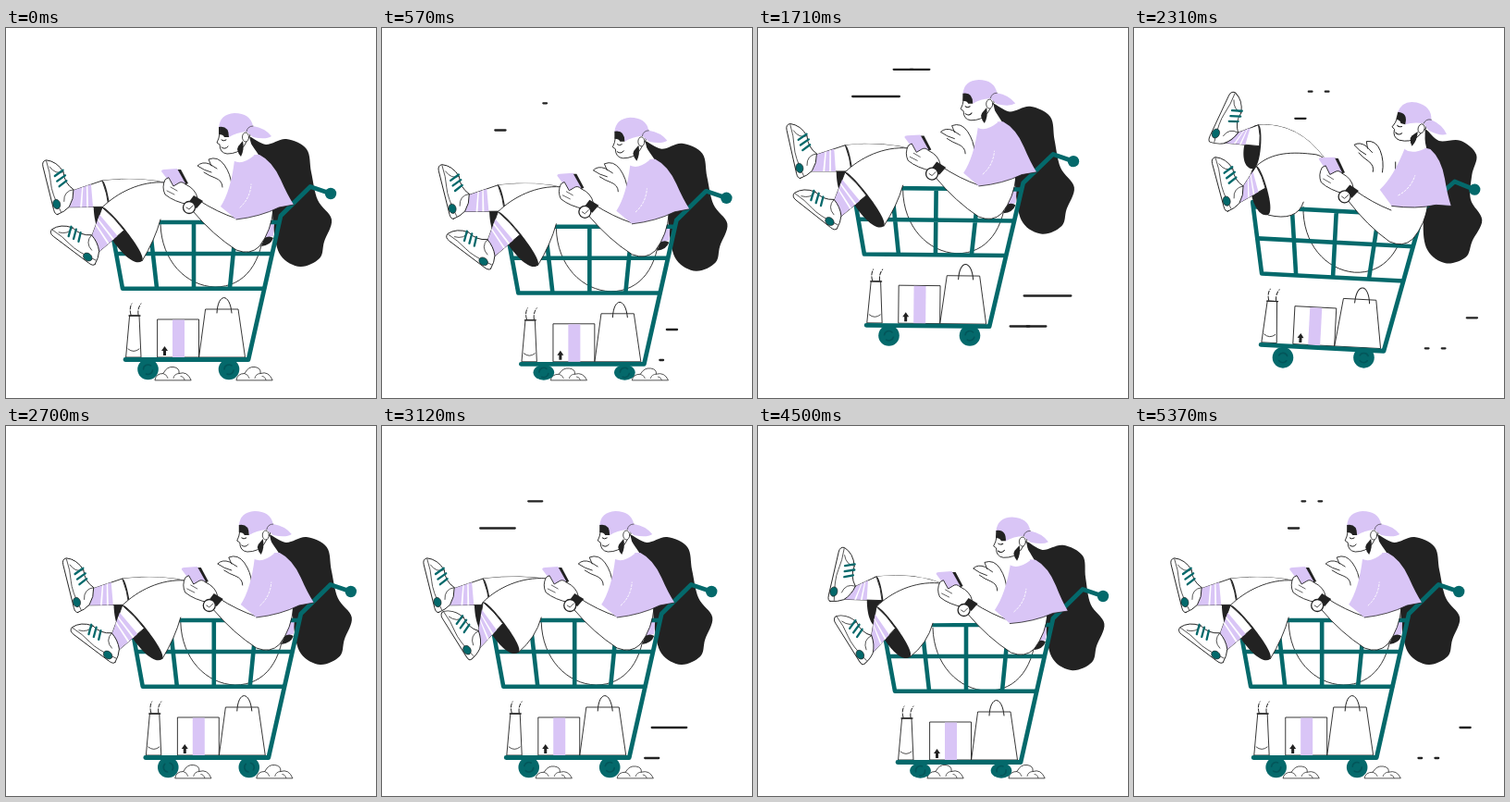
Animation of 400 by 400 pixels, one loop 5400 ms. Source, as an HTML page with a canvas:

```html
<!DOCTYPE html>
<html lang="en">
<head>
<meta charset="utf-8">
<title>Shopping cart ride</title>
<style>
html, body { margin: 0; width: 100%; height: 100%; overflow: hidden; background: #fff; }
canvas { display: block; width: 400px; height: 400px; }
</style>
</head>
<body>
<canvas id="stage"></canvas>
<script>
const LOOP = 5400, STEP = 30;
const TEAL = '#04696b', DEEP = '#03565a', INK = '#222', LILAC = '#d9c5f6', WHITE = '#fff';
const canvas = document.getElementById('stage');
const c = canvas.getContext('2d');
const ratio = window.devicePixelRatio || 1;
canvas.width = canvas.height = 400 * ratio;

const clamp = v => Math.max(0, Math.min(1, v));
const ease = v => .5 - .5 * Math.cos(Math.PI * clamp(v));

// Eases up from a to b, holds until d, eases back down by e
const swell = (t, a, b, d, e) => t < b ? ease((t - a) / (b - a)) : 1 - ease((t - d) / (e - d));
const bump = (t, mid, half) => swell(t, mid - half, mid, mid, mid + half);

const jumps = [
  { from: 620, top: 810, to: 990, high: 51 },
  { from: 1590, top: 2000, to: 2341, high: 73 },
  { from: 3990, top: 4240, to: 4460, high: 46 }
];

// Parabolic jumps with a dip just before and just after
function lift(t) {
  let y = 0;
  for (const { from, top, to, high } of jumps) {
    const u = (t - top) / (t < top ? top - from : to - top);
    if (Math.abs(u) < 1) return -high * (1 - u * u);
    y += 5 * (bump(t, from - 60, 80) + bump(t, to + 40, 80));
  }
  return y;
}

const drift = t => 22 * swell(t, 0, 640, 920, 1700) - 12 * swell(t, 920, 1700, 1780, 2750)
  + 22 * swell(t, 1780, 2750, 2750, 3390) - 5 * swell(t, 2750, 3390, 3900, 4460)
  + 22 * swell(t, 3900, 4460, 4860, 5400);

const tilt = t => 3 * swell(t, 1590, 2000, 2310, 2390)
  + 2 * (bump(t, 810, 190) + bump(t, 4230, 230));

// A few swings drive the whole figure
function poseAt(t) {
  const landing = bump(t, 1110, 300), flight = swell(t, 1650, 2310, 2310, 2520);
  const raise = flight + .4 * (bump(t, 830, 230) + bump(t, 4230, 240));
  const far = .23 * landing + 1.2 * flight + 1.4 * bump(t, 4215, 700);
  const near = flight + .6 * swell(t, 2750, 3120, 4500, 5000);
  const lean = .1 * landing + .2 * flight + .09 * bump(t, 3930, 420) + .04 * bump(t, 4500, 300);
  return {
    raise, lean,
    drop: 40 * lean - 14 * raise,
    tap: .7 * flight + bump(t, 3930, 420),
    farLeg: {
      heel: [54 + 7 * raise, 202 - 20 * far - 36 * raise], angle: 76 + 30 * far,
      top: [104 + 50 * lean, 165 - 8 * far - 34 * raise],
      end: [110, 226 - 14 * far - 40 * raise]
    },
    nearLeg: {
      heel: [95 - 9 * near - 10 * raise + 40 * lean, 257 - 6 * near - 34 * raise], angle: 37 + 35 * near,
      top: [104 + 50 * lean, 194 - 6 * near - 22 * raise],
      end: [147 - 8 * near - 10 * raise, 252 - 12 * near - 22 * raise]
    }
  };
}

function draw(path, fill, stroke = INK, width = .9) {
  const p = typeof path === 'string' ? new Path2D(path) : path;
  if (fill) { c.fillStyle = fill; c.fill(p); }
  if (stroke) { c.strokeStyle = stroke; c.lineWidth = width; c.stroke(p); }
}
const line = (d, color = INK, width = .9) => draw(d, null, color, width);
function oval(x, y, rx, ry, fill, stroke = null, width = .9) {
  const p = new Path2D();
  p.ellipse(x, y, rx, ry, 0, 0, 7);
  draw(p, fill, stroke, width);
}
function group(paint) { c.save(); paint(); c.restore(); }
const lerp = (a, b, k) => [a[0] + (b[0] - a[0]) * k, a[1] + (b[1] - a[1]) * k];
const add = (a, x, y) => [a[0] + x, a[1] + y];
function side(a, b, d) {
  const x = b[0] - a[0], y = b[1] - a[1], n = Math.hypot(x, y);
  return [y / n * d, -x / n * d];
}
function spin([x, y], a) {
  return [x * Math.cos(a) - y * Math.sin(a), x * Math.sin(a) + y * Math.cos(a)];
}

// Strokes that grow from the left and vanish to the right within six steps
function speedLines(phase) {
  if (!phase) return;
  const from = clamp((2 * phase - 5) / 6), to = clamp((2 * phase - 1) / 6);
  const streak = (x, y, size) => line(`M${x + from * size + 1},${y}H${x + to * size - 1}`, INK, 2.3);
  for (const [x, y, tailX, tailY] of [[100, 110.5, 152, 81.3], [285.5, 326, 278, 359]]) {
    streak(x, y, 79);
    streak(tailX, tailY, 34);
    if (phase > 2) streak(tailX + 18, tailY, 34);
  }
}

function dust(x, phase) {
  group(() => {
    c.translate(x, 380.5);
    c.scale(1, .93 + .07 * Math.cos(phase * Math.PI * 2 / 3));
    draw('M8,0Q9,-7 17,-7Q21,-15 28,-14Q35,-13 34,-7Q43,-10 47,0Z', WHITE, INK, .8);
    line('M17,-7Q21,-6 22,-2M34,-7Q29,-7 28,-2M36,-4Q39,-4 40,0', INK, .7);
  });
}

function wheel(x, dip, t) {
  const y = 369 + dip * .7;
  oval(x, y, 11.3, 11.3 - dip * .6, TEAL);
  group(() => {
    c.translate(x, y); c.rotate(t / 90);
    line('M-5,0A5,5 0 0 1 3,-4M5,1A5,5 0 0 1 -2,5', DEEP, 1.6);
  });
}

function goods() {
  draw('M134,311H144L146,356H130Z', WHITE);
  line('M133,311H145', INK, 1.3);
  line('M132,347Q138,352 144,347', INK, .8);
  c.setLineDash([4, 2]);
  line('M135,310Q133,303 136,298M143,310Q142,303 146,298', INK, 1);
  c.setLineDash([]);
  draw('M164,315H208.5V356H164Z', WHITE);
  draw('M180,315.5H193V356H180Z', LILAC, null);
  draw('M171.5,344L175,349H173V354H170V349H168Z', INK, null);
  draw('M216,304H251L258.5,356H209Z', WHITE);
  line('M228,308C229,286 242,286 244,308', INK, 1);
}

function cart() {
  c.lineCap = 'butt';
  line('M113,210H296M119,244H288M155,210L163,281M203,210V281M249,210L242,281', TEAL, 4.6);
  c.lineCap = 'round';
  line('M112,205L126,281.7H279', TEAL, 4.6);
  line('M129,358.5H262L297,203L329,171.5L351,179', TEAL, 4.8);
  oval(351, 179, 6.2, 6.2, TEAL);
}

// The upper locks follow the torso, the lower ones lag behind
function hair({ lean, drop, raise }) {
  const pts = [[262,119], [281,126], [303,120], [325,131], [330,156], [337,186], [352,207],
    [344,231], [339,249], [318,258], [297,246], [289,215], [285,160]].map(([x, y]) => {
      const w = Math.max(.3, clamp((215 - y) / 90));
      return add(spin([x - 250, y - 240], lean * w), 250 + 7 * raise, 240 + drop * w);
    });
  const n = pts.length, at = i => pts[(i + n) % n], p = new Path2D();
  p.moveTo(...pts[0]);
  pts.forEach((a, i) => {
    const prev = at(i - 1), b = at(i + 1), next = at(i + 2);
    p.bezierCurveTo(...add(a, (b[0] - prev[0]) / 6, (b[1] - prev[1]) / 6),
      ...add(b, (a[0] - next[0]) / 6, (a[1] - next[1]) / 6), ...b);
  });
  draw(p, INK, null);
}

function hips(drop) {
  group(() => {
    c.translate(0, drop * .8);
    draw('M167,205C168,252 195,279 226,280C258,280 278,254 279,205Z', WHITE, null);
    line('M167,212C168,252 195,279 226,280C258,280 278,254 279,210');
    draw('M281,213L290,211L289,225L279,227Z', LILAC, null);
    draw('M279,227Q285,224 289,227Q286,235 276,236Z', INK, null);
  });
}

function shoe(heel, turn) {
  group(() => {
    c.translate(...heel);
    c.rotate(turn);
    draw('M0,-2Q-1,-10 -5,-16Q-12,-23 -22,-25Q-31,-17 -43,-19Q-56,-15 -60,-4Q-60,1 -54,1L-6,1Q0,1 0,-2Z', WHITE);
    line('M-59,-4Q-46,-5 -35,-3T-2,-6M-22,-25Q-23,-14 -12,-12M-43,-19Q-42,-10 -52,-6', INK, .7);
    line('M-45,-19L-41,-9M-39,-20L-35,-10M-33,-20L-29,-11', TEAL, 2.3);
    oval(-11, -3.5, 5.2, 4, TEAL, INK, .6);
  });
}

// Dark inside of a trouser leg, then the shin and shoe coming out of it
function foot({ heel, angle, top, end }, sock) {
  const [x, y] = side(top, end, 14), hole = new Path2D();
  hole.moveTo(...top);
  hole.bezierCurveTo(...add(top, -x, -y), ...add(end, -x * 1.3, -y * 1.3), ...end);
  hole.bezierCurveTo(...add(end, x * .7, y * .7), ...add(top, x * .4, y * .4), ...top);
  draw(hole, INK, null);

  const turn = angle * Math.PI / 180;
  const a = add(spin([-21, -24], turn), ...heel), b = add(spin([-5, -14], turn), ...heel);
  const low = add(lerp(top, end, .47), x * .3, y * .3);
  const shin = new Path2D();
  shin.moveTo(...a); shin.lineTo(...top);
  shin.quadraticCurveTo(...add(lerp(top, low, .5), x * .15, y * .15), ...low);
  shin.lineTo(...b);
  draw(shin, WHITE);
  const band = (from, to, color) => {
    const q = new Path2D();
    q.moveTo(...lerp(a, top, from)); q.lineTo(...lerp(a, top, to));
    q.lineTo(...lerp(b, low, to)); q.lineTo(...lerp(b, low, from)); q.closePath();
    draw(q, color, null);
  };
  band(0, sock, LILAC);
  band(sock * .5, sock * .57, WHITE);
  band(sock * .75, sock * .82, WHITE);
  shoe(heel, turn);
}

function legs({ farLeg, nearLeg, drop }) {
  const [nx, ny] = nearLeg.top, [fx, fy] = farLeg.top;
  const knee = [172 + (nx - 104) * .6, 167 + (ny - 194) * .6];
  const seat = [167, 207 + drop * .8];
  const far = new Path2D();
  far.moveTo(fx, fy);
  far.quadraticCurveTo(fx + 42, fy - 5, knee[0] + 8, knee[1] + 2);
  draw(far, null);
  far.lineTo(...seat); far.lineTo(...farLeg.end); far.closePath();
  draw(far, WHITE, null);
  foot(farLeg, .62);

  const near = new Path2D();
  near.moveTo(...seat);
  near.quadraticCurveTo(seat[0] - 6, seat[1] + 22, ...nearLeg.end);
  near.lineTo(nx, ny);
  near.bezierCurveTo(nx + 16, ny - 16, knee[0] - 26, knee[1] - 2, ...knee);
  near.quadraticCurveTo(knee[0] + 18, knee[1] + 3, 206, 190 + drop * .5);
  const body = new Path2D(near);
  body.lineTo(214, 207 + drop * .5); body.closePath();
  draw(body, WHITE, null);
  line(near);
  foot(nearLeg, .75);
}

function freeArm(tap) {
  draw('M236,190L232,166L244,166L246,190Z', WHITE, null);
  line('M244,190Q246,176 241,160');
  group(() => {
    c.translate(-20 * tap, 6 * tap);
    draw('M207,149Q212,144 220,147L219,142Q229,138 236,148Q243,158 244,172L234,172Q234,165 226,162Q220,160 214,156L222,156Q214,154 207,149Z', WHITE, null);
    line('M244,170Q243,158 236,148Q229,138 219,142L222,149M234,172Q234,165 226,162Q220,160 214,156M222,156Q214,154 207,149Q212,144 220,147L228,152');
  });
}

function phoneArm() {
  draw('M208,186Q228,199 248,205L288,192Q288,218 274,236Q264,246 249,240Q224,224 202,198Z', WHITE, null);
  line('M208,186Q228,199 249,206M289,196Q287,219 274,236Q264,246 249,240Q224,224 202,198');
  draw('M183,153H189L197,168L190,171Z', INK, null);
  draw('M168,155Q168,153 171,153L185,152L194,168L180,171Z', LILAC, null);
  draw('M172,164Q168,172 172,180Q182,188 198,191L207,184Q205,174 194,169Q190,165 186,168L181,171L176,162Z', WHITE);
  line('M178,172L185,176M174,176L182,180', INK, .7);
  draw('M203,181L213,187L206,195L197,189Z', INK, null);
  oval(198, 194, 6.5, 6.5, WHITE, INK, 1.3);
  line('M195,194L198,196L202,192', INK, .8);
}

function shirt() {
  draw('M247,143Q259,136 274,137Q288,144 297,164Q304,180 311,191L295,194Q275,204 249,207L232,193Q243,176 247,143Z', LILAC, null);
  line('M311,191L295,194Q275,204 249,207', INK, .8);
  c.setLineDash([2, 2]);
  line('M253,194Q264,184 265,169', WHITE, .9);
  c.setLineDash([]);
}

function head() {
  draw('M241,133L247,144Q256,148 268,138L263,117H238Z', WHITE, null);
  draw('M232,108L230,119L228,124L231,126Q231,135 239,136Q251,136 257,128L264,116L260,105Z', WHITE);
  draw('M251,128L256,122Q258,131 254,139Q251,136 250,131Z', INK, null);
  oval(259, 118, 3.5, 5, WHITE, INK, .8);
  line('M233,121Q235,123 238,121M233,129Q237,132 240,128', INK, 1);
  draw('M230,108Q231,93 247,92Q264,92 267,106Q280,108 287,117Q281,121 267,118L260,112Q249,113 241,118Q241,108 230,108Z', LILAC, null);
  draw('M230,107Q241,105 241,118L236,118Q235,115 230,115Z', INK, null);
  line('M267,106Q261,106 260,112', INK, .6);
}

function torso({ lean, drop, raise, tap }) {
  const posed = paint => group(() => {
    c.translate(250 + 7 * raise, 240 + drop); c.rotate(lean); c.translate(-250, -240);
    paint();
  });
  posed(() => freeArm(tap));
  group(() => { c.translate(65 * lean, 0); phoneArm(); });
  posed(() => { shirt(); head(); });
}

function render(time) {
  const t = Math.floor(time % LOOP / STEP) * STEP;
  const phase = t / STEP % 6, y = lift(t), dip = Math.max(0, y), pose = poseAt(t);
  c.setTransform(ratio, 0, 0, ratio, 0, 0);
  c.fillStyle = WHITE;
  c.fillRect(0, 0, 400, 400);
  c.lineCap = c.lineJoin = 'round';
  c.translate(drift(t), 0);
  if (y > -2) { dust(153, phase); dust(241, phase); }
  group(() => {
    c.translate(0, Math.min(0, y));
    wheel(153.5, dip, t);
    wheel(241, dip, t);
    speedLines(phase);
  });
  c.translate(197, 369 + y);
  c.rotate(tilt(t) * Math.PI / 180);
  c.translate(-197, -369);
  hair(pose);
  hips(pose.drop);
  goods();
  cart();
  legs(pose);
  torso(pose);
}

const start = performance.now();
function tick() {
  render(performance.now() - start);
  requestAnimationFrame(tick);
}
tick();
</script>
</body>
</html>
```
